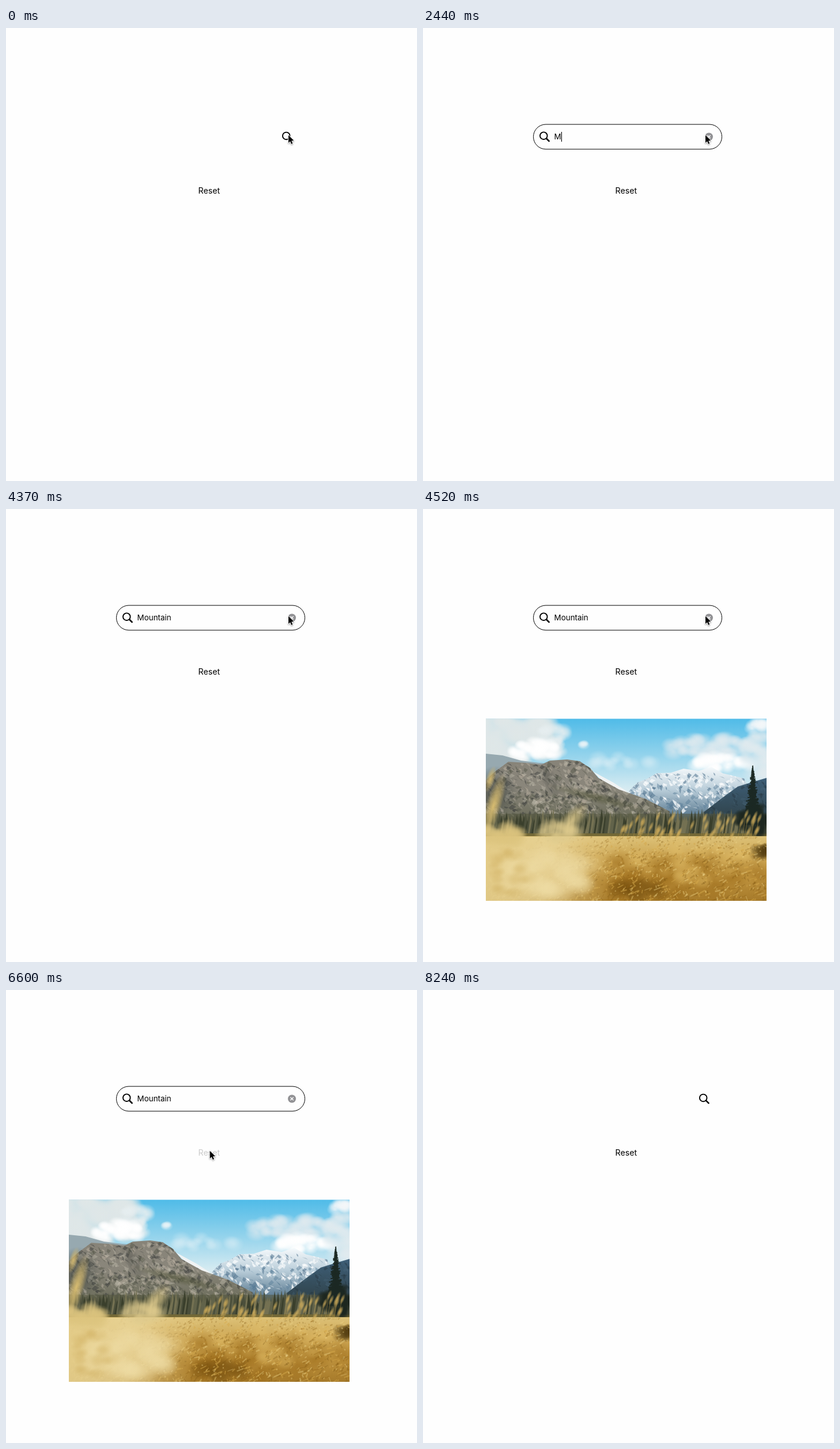
An HTML page with a canvas that plays this animation: 713 px wide and 785 px high, repeating every 8690 ms.

```html
<!DOCTYPE html>
<html lang="en">
<head>
<meta charset="utf-8">
<title>Image search field</title>
<style>
  html, body { margin: 0; width: 100%; height: 100%; overflow: hidden; background: #fefefe; }
  canvas { display: block; }
</style>
</head>
<body>
<canvas id="stage" width="713" height="785"></canvas>
<script>
const LOOP = 8690, WORD = 'Mountain';
const KEY_TIMES = [2290, 2590, 2730, 2880, 3330, 3330, 3480, 3780];
const BLINK_STARTS = [1250, 2150, ...KEY_TIMES];
const ctx = document.getElementById('stage').getContext('2d');
const photo = paintPhoto();

function polygon(points) {
  const path = new Path2D();
  for (let i = 0; i < points.length; i += 2) path.lineTo(points[i], points[i + 1]);
  path.closePath();
  return path;
}

function line(c, x1, y1, x2, y2, color, width) {
  c.strokeStyle = color;
  c.lineWidth = width;
  c.beginPath();
  c.moveTo(x1, y1);
  c.lineTo(x2, y2);
  c.stroke();
}

// Landscape in flat shapes and soft gradients, painted once.
function paintPhoto() {
  const canvas = document.createElement('canvas');
  canvas.width = 713;
  canvas.height = 785;
  const c = canvas.getContext('2d');
  let seed = 7;
  const random = (min, max) => {
    seed = (seed * 16807) % 2147483647;
    return min + (max - min) * seed / 2147483647;
  };
  const gradient = (x1, y1, x2, y2, colors) => {
    const g = c.createLinearGradient(x1, y1, x2, y2);
    colors.forEach((color, i) => g.addColorStop(i / (colors.length - 1), color));
    return g;
  };
  const fade = (y1, y2, ...colors) => gradient(0, y1, 0, y2, colors);
  const fill = (style, ...points) => {
    const path = polygon(points);
    c.fillStyle = style;
    c.fill(path);
    return path;
  };
  const glow = (x, y, rx, ry, rgb, alpha, tilt = 0) => {
    c.save();
    c.translate(x, y);
    c.rotate(tilt);
    c.scale(rx, ry);
    const g = c.createRadialGradient(0, 0, 0, 0, 0, 1);
    g.addColorStop(0, `rgba(${rgb},${alpha})`);
    g.addColorStop(0.5, `rgba(${rgb},${alpha * 0.6})`);
    g.addColorStop(1, `rgba(${rgb},0)`);
    c.fillStyle = g;
    c.fillRect(-1, -1, 2, 2);
    c.restore();
  };
  // Cloud bank or grass clump: many small glows scattered in an ellipse.
  const puffs = (count, x, y, rx, ry, size, rgb, alpha) => {
    for (let i = 0; i < count; i++) {
      const a = random(0, 6.283), d = Math.sqrt(random(0, 1)), s = random(0.5, 1) * size;
      glow(x + rx * d * Math.cos(a), y + ry * d * Math.sin(a), s * 1.3, s, rgb, alpha);
    }
  };
  // Rock faces: small slanted shards clipped to a mountain.
  const shards = (path, count, x1, x2, y1, y2, colors) => {
    c.save();
    c.clip(path);
    for (let i = 0; i < count; i++) {
      const x = random(x1, x2), y = random(y1, y2), w = random(2, 8), h = random(3, 12);
      const lean = random(-5, 9);
      fill(colors[i % colors.length], x, y, x + w, y + h * 0.4, x + lean + w * 0.4, y + h, x + lean - 1, y + h * 0.6);
    }
    c.restore();
  };

  c.beginPath();
  c.rect(109, 363.5, 487, 315.5);
  c.clip();
  c.fillStyle = fade(363, 490, '#4fbbe8', '#93d3ec', '#dcedf2');
  c.fillRect(109, 363, 487, 316);

  // Clouds
  puffs(70, 150, 398, 75, 45, 26, '223,231,231', 0.8);
  puffs(24, 225, 400, 24, 26, 14, '230,238,240', 0.8);
  puffs(30, 195, 418, 42, 14, 13, '255,255,255', 0.95);
  puffs(5, 276, 408, 6, 3, 9, '232,243,247', 0.7);
  puffs(14, 345, 440, 55, 14, 15, '224,240,246', 0.4);
  puffs(35, 495, 412, 78, 16, 17, '224,234,239', 0.7);
  puffs(28, 520, 442, 50, 12, 15, '255,255,255', 0.85);
  puffs(25, 580, 428, 30, 40, 20, '226,235,239', 0.7);
  puffs(12, 582, 376, 18, 10, 12, '244,247,249', 0.8);

  // Mountains
  fill('#97a9b0', 109, 424, 138, 427, 170, 436, 210, 441, 240, 500, 109, 500);
  const snow = fill(fade(447, 526, '#f6fafc', '#b9cdd9', '#67859a'),
    356, 490, 372, 474, 388, 468, 405, 458, 430, 457, 452, 450, 478, 454,
    500, 447, 520, 458, 557, 467, 575, 500, 520, 540, 400, 540);
  shards(snow, 330, 355, 565, 456, 520, ['rgba(80,115,143,.55)', 'rgba(250,252,254,.75)', 'rgba(95,130,155,.5)', 'rgba(255,255,255,.6)']);
  fill('#f0f3f4', 295, 455, 330, 474, 355, 490, 330, 490);
  const rock = fill(fade(434, 535, '#878378', '#8a867b', '#6d6e5c'),
    109, 470, 125, 455, 148, 438, 180, 440, 205, 443, 220, 436, 250, 434, 272, 437,
    290, 449, 304, 466, 340, 486, 385, 502, 428, 524, 428, 550, 109, 550);
  shards(rock, 950, 105, 425, 436, 528,
    ['rgba(60,62,60,.5)', 'rgba(178,170,156,.55)', 'rgba(88,90,76,.5)', 'rgba(196,189,176,.4)']);
  glow(125, 490, 40, 45, '55,62,58', 0.65);
  glow(220, 470, 14, 36, '60,62,58', 0.4, -0.5);
  glow(300, 500, 90, 10, '84,86,58', 0.6, 0.25);
  const hill = fill(fade(466, 540, '#3e5f78', '#2f4148'),
    486, 526, 520, 500, 546, 481, 572, 473, 596, 466, 596, 560, 486, 560);
  shards(hill, 90, 490, 596, 470, 530, ['rgba(35,52,62,.4)', 'rgba(75,103,123,.3)']);

  // Forest
  c.fillStyle = fade(522, 574, 'rgba(85,88,66,.4)', '#4c4d35', '#8a7838');
  c.fillRect(109, 528, 487, 46);
  const greens = ['#4b4f3b', '#62634a', '#3a3f2c', '#747152'];
  for (let x = 109; x < 596; x += 3) {
    const top = random(518, 540);
    fill(greens[Math.floor(random(0, 4))], x, top, x + 5, 562, x - 5, 562);
  }
  puffs(40, 575, 538, 30, 24, 13, '28,38,31', 0.85);
  for (let y = 443; y < 545; y += 1.5) {
    const half = 1 + (y - 443) * 0.15;
    line(c, 572 - half * random(0.5, 1.2), y + 3, 572 + half * random(0.5, 1.2), y + 2, '#1b2823', 2);
  }

  // Meadow
  c.fillStyle = fade(562, 679, '#dfc67e', '#cda755', '#bd913c', '#a67a2a');
  c.fillRect(109, 567, 487, 112);
  puffs(45, 440, 635, 150, 40, 28, '150,101,20', 0.3);
  puffs(30, 480, 610, 110, 35, 22, '226,190,104', 0.35);
  puffs(20, 370, 662, 45, 16, 18, '116,78,14', 0.35);
  puffs(10, 588, 592, 12, 10, 13, '80,58,14', 0.6);
  const straw = ['rgba(236,209,135,.4)', 'rgba(144,97,20,.32)', 'rgba(211,167,74,.5)', 'rgba(112,76,15,.25)'];
  for (let i = 0; i < 1700; i++) {
    const x = random(109, 600), y = random(568, 684), s = random(2, 4 + (y - 560) / 14);
    line(c, x, y, x + s * random(-0.5, 1.4), y - s * random(0.2, 0.9), straw[i % 4], random(1, 2.8));
  }
  for (let i = 0; i < 45; i++) {
    const x = random(330, 590), top = random(528, 566);
    line(c, x, 572, x + 6, top, 'rgba(190,155,75,.4)', 1.2);
    glow(x + 7, top, 3.5, 10, '214,178,94', 0.75, 0.4);
  }
  c.fillStyle = gradient(109, 600, 330, 650, ['rgba(228,205,138,.95)', 'rgba(234,214,154,.8)', 'rgba(228,200,130,0)']);
  c.fillRect(109, 568, 230, 111);
  puffs(45, 205, 630, 85, 42, 24, '238,220,164', 0.4);
  puffs(22, 150, 630, 40, 40, 15, '208,176,98', 0.3);
  glow(122, 515, 14, 60, '222,193,114', 0.95, 0.3);
  glow(117, 468, 8, 24, '218,190,113', 0.9, 0.3);
  puffs(22, 135, 562, 34, 18, 20, '220,196,126', 0.6);
  puffs(16, 235, 560, 32, 12, 16, '222,202,140', 0.5);
  glow(254, 545, 18, 48, '222,202,140', 0.9, 0.7);
  return canvas;
}

function magnifier(x, y, radius, width, alpha) {
  ctx.globalAlpha = alpha;
  ctx.strokeStyle = '#000';
  ctx.lineWidth = width;
  ctx.beginPath();
  ctx.arc(x, y, radius, 0, Math.PI * 2);
  ctx.stroke();
  ctx.lineCap = 'round';
  line(ctx, x + 4.8, y + 4.8, x + 9.3, y + 9.3, '#000', width + 0.6);
  ctx.lineCap = 'butt';
  ctx.globalAlpha = 1;
}

function fieldOutline() {
  ctx.strokeStyle = '#000';
  ctx.lineWidth = 1;
  ctx.beginPath();
  ctx.roundRect(191.5, 167, 327, 43, 21.5);
  ctx.stroke();
}

function clearButton() {
  ctx.fillStyle = '#929295';
  ctx.beginPath();
  ctx.arc(496, 188.5, 7, 0, Math.PI * 2);
  ctx.fill();
  line(ctx, 493.4, 185.9, 498.6, 191.1, '#fff', 1.4);
  line(ctx, 498.6, 185.9, 493.4, 191.1, '#fff', 1.4);
}

function caretAlpha(t) {
  const start = BLINK_STARTS.filter(s => s <= t).pop();
  const phase = (t - start) % 1040;
  return phase < 440 ? 1 : phase < 590 ? 0.5 : 0;
}

function searchField(t) {
  fieldOutline();
  magnifier(209.3, 186.7, 6.3, 1.9, 1);
  const typed = WORD.slice(0, KEY_TIMES.filter(k => k <= t).length);
  ctx.font = '13.4px Inter, sans-serif';
  ctx.textAlign = 'left';
  ctx.fillStyle = '#000';
  ctx.fillText(typed, 227.6, 193);
  ctx.globalAlpha = caretAlpha(t);
  ctx.fillRect(227.8 + ctx.measureText(typed).width, 180, 1.1, 17);
  ctx.globalAlpha = 1;
  if (t >= 2440) clearButton();
}

function resetButton(t) {
  ctx.globalAlpha = t >= 6600 && t < 6900 ? 0.2 : t >= 6900 && t < 7050 ? 0.85 : 1;
  ctx.font = '14.2px Inter, sans-serif';
  ctx.textAlign = 'center';
  ctx.fillStyle = '#000';
  ctx.fillText('Reset', 352.4, 286.5);
  ctx.globalAlpha = 1;
}

const ease = (t, from, to) => {
  const p = Math.min(1, Math.max(0, (t - from) / (to - from)));
  return p * p * (3 - 2 * p);
};

const arrow = polygon([0, 0, 0, 13.2, 3, 10.4, 5.1, 15.2, 7.3, 14.2, 5.2, 9.6, 9.3, 9.3]);

function pointer(t) {
  const tick = 1251 + Math.floor((t - 1251) / 148.6) * 148.6;
  const toReset = ease(tick, 5180, 6240), away = ease(tick, 7360, 8220);
  ctx.save();
  ctx.translate(490 - 136.3 * toReset + 311 * away, 185.8 + 93 * toReset + 514 * away);
  ctx.lineJoin = 'round';
  ctx.strokeStyle = '#fff';
  ctx.lineWidth = 1.8;
  ctx.shadowColor = 'rgba(0,0,0,.4)';
  ctx.shadowBlur = 2.5;
  ctx.shadowOffsetY = 1.2;
  ctx.stroke(arrow);
  ctx.shadowColor = 'transparent';
  ctx.fillStyle = '#000';
  ctx.fill(arrow);
  ctx.restore();
}

function draw(now) {
  const t = now % LOOP;
  ctx.fillStyle = '#fefefe';
  ctx.fillRect(0, 0, 713, 785);
  if (t >= 1250 && t < 6900) searchField(t);
  else magnifier(486.2, 186.9, 6.3, 1.9, t >= 890 && t < 1250 ? 0.2 : 1);
  resetButton(t);
  if (t >= 4520 && t < 6900) ctx.drawImage(photo, 0, 0);
  pointer(t);
  requestAnimationFrame(draw);
}
draw(0);
</script>
</body>
</html>
```
